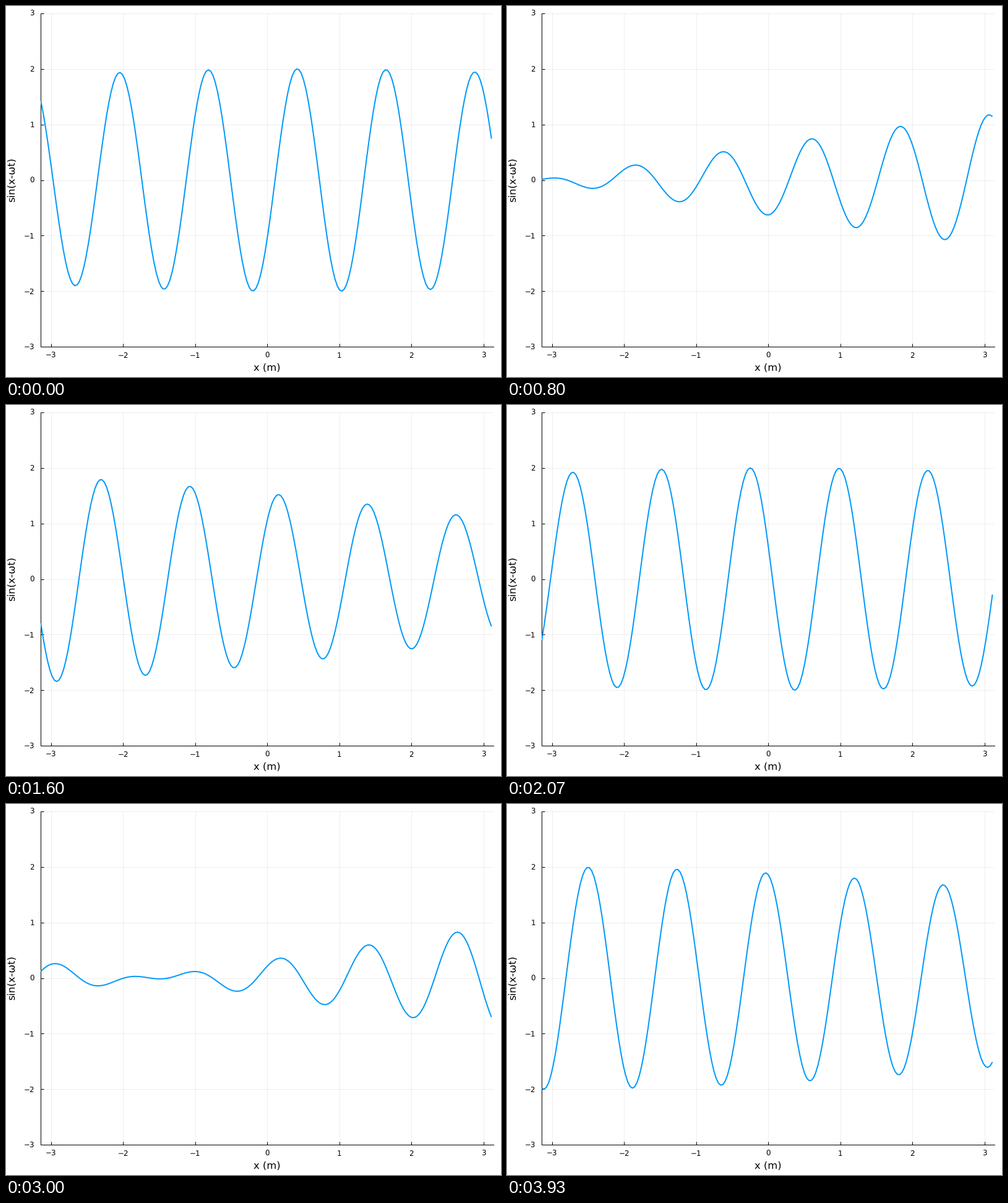
Recreate the animation shown at these times as a matplotlib script. Size 800x600 px, loop 3.99 s.

```python
import numpy as np
import matplotlib.pyplot as plt
from matplotlib.animation import FuncAnimation

W, H, DPI = 800, 600, 100
PX = 72 / DPI  # points per pixel
LEFT, RIGHT, TOP, BOTTOM = 56.3, 788.2, 11.8, 551.2
FRAMES, LOOP_MS = 60, 3990

plt.rcParams.update({
    "font.family": "DejaVu Sans",
    "text.hinting": "none",
    "path.simplify": False,
})

fig = plt.figure(figsize=(W / DPI, H / DPI), dpi=DPI, facecolor="white")
ax = fig.add_axes([LEFT / W, 1 - BOTTOM / H, (RIGHT - LEFT) / W, (BOTTOM - TOP) / H])
ax.set(xlim=(-np.pi, np.pi), ylim=(-3, 3))


def label(x, y, text, size, **kw):
    """Place text at pixel coordinates measured from the top left."""
    fig.text(x / W, 1 - y / H, text, fontsize=size * PX, color="black", **kw)


def style_axes():
    ticks = np.arange(-3, 4)
    ax.set_xticks(ticks)
    ax.set_yticks(ticks)
    ax.tick_params(direction="in", length=5 * PX, width=PX,
                   labelbottom=False, labelleft=False)
    ax.grid(color="black", alpha=0.065, linewidth=PX)
    ax.set_axisbelow(True)
    ax.spines[["top", "right"]].set_visible(False)
    ax.spines[["left", "bottom"]].set_linewidth(PX)

    for v in ticks:
        text = str(v).replace("-", "\u2212")
        x = LEFT + (v + np.pi) / (2 * np.pi) * (RIGHT - LEFT)
        y = BOTTOM - (v + 3) / 6 * (BOTTOM - TOP)
        label(x, 568.8, text, 11.9, ha="center", va="baseline")
        label(46, y + 4.3, text, 11.9, ha="right", va="baseline")

    label((LEFT + RIGHT) / 2, 590.3, "x (m)", 16.4, ha="center", va="baseline")
    label(13.8, (TOP + BOTTOM) / 2, "sin(x-ωt)", 16.4, rotation=90,
          rotation_mode="anchor", ha="center", va="baseline")


style_axes()
x = np.linspace(-np.pi, np.pi, 200, endpoint=False)
curve, = ax.plot([], [], color="#009afa", linewidth=2 * PX, zorder=3,
                 solid_joinstyle="round", solid_capstyle="butt")


def update(n):
    # two travelling waves that beat against each other
    slow = np.sin(5.0 * x - 0.5 * n - 0.5)
    fast = np.sin(5.2 * x - 0.7 * n - 0.6)
    curve.set_data(x, slow + fast)
    return curve,


anim = FuncAnimation(fig, update, frames=FRAMES, interval=LOOP_MS / FRAMES,
                     repeat=True, repeat_delay=0)
plt.show()
```
